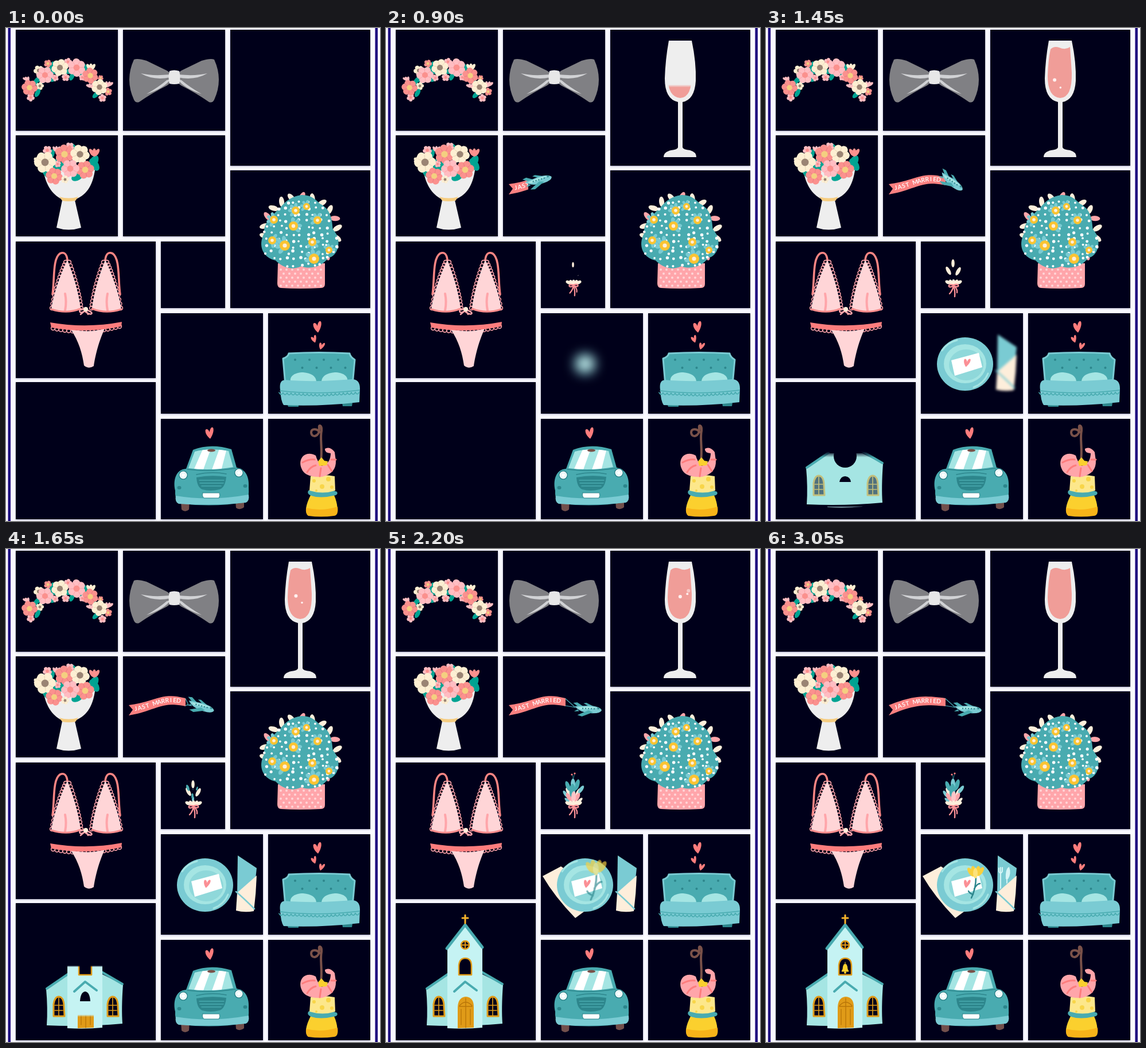
An HTML page with a canvas that plays this animation: 652x859 px, repeating every 3.1 s.

```html
<!DOCTYPE html>
<html>
<head>
<meta charset="utf-8">
<style>
html, body { margin: 0; width: 100%; height: 100%; overflow: hidden; background: #fff; }
canvas { display: block; }
</style>
</head>
<body>
<canvas id="stage" width="652" height="859"></canvas>
<script>
const W = 652, H = 859, LOOP = 3100, STEP = 50, TAU = Math.PI * 2;
const NIGHT = '#00001a', TEAL = '#49abb0', SKY = '#7acbd3', ICE = '#a5e5e3', DEEP = '#2d868c',
  CORAL = '#fd7d7d', PINK = '#ffa5aa', BLUSH = '#ffd5d7', CREAM = '#fdeedb', LEAF = '#00a392',
  GOLD = '#e09b18', SUN = '#fbd02e', BROWN = '#795149', PALE = '#eeeeee', WHITE = '#ffffff';
const stage = document.getElementById('stage').getContext('2d');
let g = stage;

// Drawing helpers
function shape(d, fill, stroke, width = 1) {
  const p = new Path2D(d);
  if (fill) { g.fillStyle = fill; g.fill(p); }
  if (stroke) {
    g.strokeStyle = stroke; g.lineWidth = width;
    g.lineCap = g.lineJoin = 'round';
    g.stroke(p);
  }
}
function oval(x, y, rx, ry, fill, turn = 0) {
  g.beginPath(); g.ellipse(x, y, rx, ry, turn, 0, TAU);
  g.fillStyle = fill; g.fill();
}
const dot = (x, y, r, fill) => oval(x, y, r, r, fill);
function ring(x, y, r, color, width) {
  g.beginPath(); g.arc(x, y, r, 0, TAU);
  g.strokeStyle = color; g.lineWidth = width; g.stroke();
}
function at(x, y, turn, scale, draw) {
  g.save(); g.translate(x, y); g.rotate(turn); g.scale(scale, scale);
  draw(); g.restore();
}
function mirror(axis, draw) {
  draw();
  g.save(); g.translate(2 * axis, 0); g.scale(-1, 1); draw(); g.restore();
}
function heart(x, y, size, turn = 0, fill = CORAL) {
  at(x, y, turn, size, () =>
    shape('M0,1.1 C-.5,.6 -.9,-.1 -.75,-.7 C-.5,-1 -.1,-.7 0,-.2 C.2,-1 .6,-1.3 .8,-.9 C.9,-.2 .4,.6 0,1.1Z', fill));
}
function random(seed) {
  return () => (seed = seed * 16807 % 2147483647) / 2147483647;
}
function layer(draw) {
  const c = document.createElement('canvas'), keep = g;
  c.width = W; c.height = H;
  g = c.getContext('2d'); draw(); g = keep;
  return c;
}

// Flowers
const KINDS = {
  s: ['#fb918e', '#f4cf80', '#dd7674'],
  c: ['#fdefd3', '#9a8474', '#e0cda9'],
  p: ['#ffbdc2', '#fb918e', '#f39a9f']
};
function flower(x, y, r, kind) {
  const [petal, heartColor, vein] = KINDS[kind], n = r > 9 ? 6 : 5;
  for (let i = 0; i < n; i++) {
    const a = i * TAU / n + x, px = Math.cos(a), py = Math.sin(a);
    oval(x + px * r * .58, y + py * r * .58, r * .42, r * .42, petal, a);
  }
  dot(x, y, r * .55, petal);
  g.strokeStyle = vein; g.lineWidth = .7;
  g.beginPath();
  for (let i = 0; i < n; i++) {
    const a = (i + .5) * TAU / n + x;
    g.moveTo(x + Math.cos(a) * r * .3, y + Math.sin(a) * r * .3);
    g.lineTo(x + Math.cos(a) * r * .72, y + Math.sin(a) * r * .72);
  }
  g.stroke();
  dot(x, y, r * .34, heartColor);
}
function garden(list) {
  for (const item of list.split(' ')) {
    const [x, y, r, kind] = item.split(',');
    flower(+x, +y, +r, kind);
  }
}
function tulip(x, y, r, fill, turn = 0) {
  for (const k of [-.55, 0, .55]) oval(x + k * r, y, r * .42, r * .9, fill, k + turn);
}

// Still pictures
function frame() {
  g.fillStyle = '#fafaff'; g.fillRect(0, 0, W, H);
  g.fillStyle = '#1e0680'; g.fillRect(3.5, 0, 4.5, H); g.fillRect(643.5, 0, 4.5, H);
  g.fillStyle = WHITE; g.fillRect(0, 0, 3, H); g.fillRect(649, 0, 3, H);
  const cells = [[17, 3, 178, 176], [204, 3, 178, 176], [391, 3, 244, 237], [17, 187, 178, 176],
    [204, 187, 178, 176], [391, 248, 244, 240], [17, 372, 244, 238], [270, 372, 112, 116],
    [270, 497, 178, 175], [457, 497, 178, 175], [17, 617, 244, 239], [270, 681, 178, 175], [457, 681, 178, 175]];
  g.save();
  g.fillStyle = NIGHT; g.shadowColor = 'rgba(30,25,80,.35)'; g.shadowBlur = 3; g.shadowOffsetY = 1;
  for (const [x, y, w, h] of cells) g.fillRect(x, y, w, h);
  g.restore();
}
function wreath() {
  shape('M42,113 Q52,78 92,75 Q145,75 163,106', null, LEAF, 8);
  for (const [x, y, a] of [[55, 113, .5], [60, 90, -.6], [80, 66, .3], [84, 88, .9], [115, 84, .4], [137, 68, -.5], [157, 116, .8]])
    oval(x, y, 4, 8, LEAF, a);
  tulip(148, 68, 7, KINDS.c[0]); tulip(36, 89, 5, KINDS.p[0], -.5);
  tulip(179, 98, 6, KINDS.p[0], .4); tulip(148, 101, 6, KINDS.p[0], -.7);
  garden('73,62,7,s 108,59,7,p 86,87,6,p 104,86,7,p 133,86,6,p 165,87,5,s 43,121,7,p 178,111,7,s 168,122,7,p ' +
    '57,74,9,c 59,101,7,c 68,82,15,p 123,69,16,p 94,69,15,c 147,83,14,s 163,103,14,c 41,104,14,s');
}
function bow() {
  mirror(293, () => {
    shape('M223,55 Q229,52 245,57 L280,74 Q287,77 287,86 Q287,97 281,100 Q255,113 232,129 Q226,131 223,125 Q207,90 223,55Z', '#808084');
    shape('M286,86 Q257,92 235,79 Q255,84 286,81Z M287,89 Q276,105 245,115 Q266,103 280,91Z', '#d1d2d5');
  });
  shape('M285,75 Q293,72 302,75 Q305,86 302,97 Q293,99 285,97 Q282,86 285,75Z', '#e7e7e8');
}
function bouquet() {
  shape('M64,242 C68,272 80,290 97,298 L122,298 C142,290 153,272 156,240Z M98,300 L88,348 Q109,355 131,348 L120,300Z', PALE);
  shape('M93,294 Q109,299 126,294 L121,301 Q109,303 98,301Z', '#f6cd81');
  for (const [x, y, a] of [[76, 222, .6], [88, 240, 0], [117, 212, -.4], [153, 233, .5], [154, 238, -.6], [98, 240, 1], [72, 252, -.7], [125, 258, 1]])
    oval(x, y, 7, 12, LEAF, a);
  tulip(154, 217, 8, KINDS.s[0]); tulip(88, 211, 6, KINDS.p[0]);
  garden('72,213,8,p 111,207,8,p 54,230,6,c 90,237,6,p 102,220,17,s 129,220,17,c 68,234,19,c ' +
    '84,258,15,s 138,247,16,s 112,245,16,p 103,264,7,c');
}
function bush() {
  for (let i = 0; i < 19; i++) {
    const a = -4.15 + i * .29;
    oval(514 + Math.cos(a) * 64, 354 + Math.sin(a) * 60, 9, 4.5, i % 4 == 1 ? PINK : CREAM, a + (i % 2 - .5) * .9);
  }
  shape('M474,410 L556,410 L556,446 Q556,453 549,453 Q512,455 479,453 Q473,452 473,445Z', PINK);
  for (let y = 421, k = 0; y < 452; y += 7, k++)
    for (let x = 479 + k % 2 * 5; x < 554; x += 10) dot(x, y, 2, BLUSH);
  const blob = 'M515,291 C532,290 541,300 547,306 C570,317 568,341 570,351 C588,370 578,399 562,400 C551,417 528,421 515,415 C496,424 480,415 470,405 C449,401 438,380 450,358 C448,339 466,325 478,313 C489,300 499,293 515,291Z';
  shape(blob, TEAL);
  const area = new Path2D(blob), rnd = random(41);
  for (let y = 300; y < 415; y += 11)
    for (let x = 450; x < 582; x += 12) {
      const px = x + rnd() * 7, py = y + rnd() * 6;
      if (g.isPointInPath(area, px, py)) dot(px, py, 1.8 + rnd(), WHITE);
    }
  for (const [x, y, r] of [[505, 318, 7], [524, 311, 6], [467, 334, 7], [501, 345, 8], [543, 335, 7], [464, 370, 7], [486, 379, 9], [534, 373, 7], [563, 387, 6], [537, 402, 9]]) {
    for (let i = 0; i < 4; i++) {
      const a = i * .8 + x;
      oval(x + Math.cos(a) * r * 1.2, y + Math.sin(a) * r * 1.2, r * .7, r * .42, SKY, a);
    }
    dot(x, y, r, '#fbc432'); dot(x, y, r * .4, CREAM);
  }
}
function beads(x0, y0, cx, cy, x1, y1, n, color) {
  for (let i = 0; i <= n; i++) {
    const u = i / n, v = 1 - u;
    ring(v * v * x0 + 2 * u * v * cx + u * u * x1, v * v * y0 + 2 * u * v * cy + u * u * y1, 3.4, color, 1.6);
  }
}
function bikini() {
  mirror(140, () => {
    shape('M81,464 C85,438 81,402 94,393 Q105,388 107,404', null, '#f98583', 3.6);
    beads(104, 408, 90, 438, 80, 488, 13, PINK);
    beads(110, 408, 125, 448, 131, 488, 13, PINK);
    shape('M107,404 C113,420 125,450 130,488 Q105,501 79,490 C83,460 97,425 107,404Z', BLUSH);
    shape('M103,463 Q106,477 103,492', null, PINK, 4);
    shape('M79,490 Q106,499 130,489', null, '#f98c8c', 3);
  });
  shape('M137,491 C125,485 126,502 137,493 C147,503 158,497 140,491 M137,493 L130,499 M140,493 L143,499', null, PINK, 2.5);
  dot(139, 490, 4, CREAM);
  beads(82, 523, 140, 536, 198, 520, 17, PINK);
  shape('M113,525 Q142,532 172,524 C160,550 155,575 153,589 Q144,595 136,588 C133,567 127,546 113,525Z', BLUSH);
  shape('M77,513 Q140,524 202,512 L201,520 Q140,533 79,522Z', CORAL);
}
function couch() {
  heart(543, 521, 9, -.1); heart(537, 542, 6, -.3); heart(550, 554, 6, .3);
  shape('M490,654 h20 v6 h-18Z M586,653 h18 l-1,6 h-16Z', DEEP);
  shape('M483,576 Q492,573 493,567 Q545,564 599,567 Q600,573 608,578 L604,622 L487,622Z', TEAL, SKY, 3);
  for (let i = 0; i < 8; i++)
    dot(504 + i * 12.5, i % 2 ? 592 : 578, 2, DEEP);
  mirror(545.5, () => shape('M496,616 C494,607 503,600 518,600 Q540,602 541,616Z', ICE));
  shape('M478,630 C476,612 484,612 495,614 Q545,617 603,612 Q617,612 617,628 L616,652 Q545,660 484,657 Q479,650 478,630Z', SKY);
  let wave = 'M476,635';
  for (let x = 476; x < 612; x += 7) wave += ' q3.5,7 7,' + (x < 545 ? .3 : -.4);
  shape(wave, null, TEAL, 1.6);
  shape('M478,632 Q545,640 616,631', null, TEAL, 1.6);
}
function car() {
  heart(355, 706, 9, -.1);
  shape('M305,824 h15 l-1,15 q-7,6 -13,0Z M400,824 h15 v11 q-7,6 -14,1Z', '#72504c');
  shape('M314,768 L326,735 Q357,723 393,734 L402,766 C420,769 424,785 423,800 Q424,817 420,826 Q360,836 300,828 Q294,817 295,806 C291,790 295,769 314,768Z', TEAL);
  const glass = 'M318,767 L329,738 Q357,731 388,737 L396,765 Q357,772 318,767Z';
  shape(glass, ICE);
  g.save(); g.clip(new Path2D(glass));
  shape('M325,775 L347,725 L360,725 L342,775Z M357,775 L375,725 L387,725 L374,775Z', WHITE);
  g.restore();
  oval(358, 736, 7, 2.5, BROWN);
  shape('M316,769 Q357,774 400,767 M332,778 Q358,772 384,777', null, DEEP, 1.5);
  for (const [x, y] of [[309, 779], [406, 775]]) { dot(x, y, 8, DEEP); dot(x, y, 6.5, WHITE); ring(x, y, 4, '#cfeff0', 1.2); }
  shape('M332,783 Q357,778 384,782 Q382,801 372,804 Q357,808 342,804 Q333,800 332,783Z', DEEP);
  shape('M337,788 H380 M338,793 H379 M341,798 H375', null, TEAL, 1.5);
  oval(302, 801, 3.5, 3, DEEP); oval(417, 798, 3.5, 3, DEEP);
  shape('M296,815 Q357,825 423,813 Q425,824 418,827 Q357,833 301,829 Q294,826 296,815Z', SKY);
  shape('M343,810 h29 q2,5 -1,9 h-26 q-4,-4 -2,-9Z', WHITE, DEEP, 1);
}
function canape() {
  shape('M549,752 C552,735 547,715 550,702 C551,691 544,690 546,698 C547,712 533,715 532,705 C532,698 541,697 547,704', null, BROWN, 4);
  shape('M531,814 Q549,809 572,814 Q582,838 574,849 Q549,853 526,849 Q518,840 531,814Z', SUN);
  shape('M523,836 Q550,843 578,834 Q580,849 572,850 Q549,853 527,850 Q522,847 523,836Z', '#f8b319');
  shape('M527,806 Q550,798 577,808 Q580,814 570,815 Q548,820 532,815 Q524,812 527,806Z', TEAL);
  shape('M531,781 Q553,777 573,781 L574,806 Q552,813 529,806Z', '#fde78b');
  for (const [x, y, r] of [[537, 789, 3], [562, 786, 4], [551, 799, 4], [568, 800, 3], [541, 806, 2]]) dot(x, y, r, '#f8d548');
  shape('M540,745 C523,735 508,749 515,767 Q521,784 551,782 Q576,776 575,754 L573,739 Q565,728 556,733 Q555,740 566,741 Q566,759 550,763 Q543,756 540,745Z', PINK);
  shape('M517,757 Q528,751 538,752 M525,774 Q531,764 540,762 M547,781 L549,767 M568,772 L561,761 M575,752 L567,752', null, CORAL, 3);
  shape('M544,755 L550,748 L555,754 L561,755 L559,762 L546,763Z', SUN);
}
const scenery = layer(() => [frame, wreath, bow, bouquet, bush, bikini, couch, car, canape].forEach(draw => draw()));

// Moving pieces
const glass = layer(() => shape('M493,22 L533,22 Q541,60 540,92 Q538,125 517,129 L517,208 Q518,212 530,213 Q541,216 541,225 L484,225 Q484,216 497,213 Q508,212 509,208 L509,129 Q486,124 486,88 Q487,55 493,22Z', PALE));
const wine = layer(() => shape('M496,37 Q502,31 511,34 Q522,39 530,33 L533,78 Q534,121 513,122 Q491,120 491,84 Q492,55 496,37Z', '#f09d98'));

const napkin = layer(() => shape('M305,553 L273,570 Q294,606 330,643 L382,605Z', CREAM));
const plate = layer(() => {
  oval(347, 585.5, 49, 46.5, SKY);
  shape('M307,562 Q316,548 333,544 M387,602 Q380,619 362,626', null, ICE, 3);
  oval(347, 585, 37, 34, ICE);
  oval(349, 587, 30, 27, '#8fd8da');
  shape('M323,579 L371,566 L377,591 L329,606Z', WHITE);
  heart(350, 583, 7, .2, '#fb8f95');
});
const pocket = layer(() => {
  shape('M404,534 L437,556 L435,575 L403,602Z', SKY);
  shape('M403,599 L437,569 Q436,600 432,631 Q416,634 401,630Z', CREAM);
  shape('M401,597 Q415,609 433,627', null, SKY, 2.5);
});
const bloom = layer(() => {
  shape('M366,571 Q366,592 358,608 M363,592 Q368,583 373,583 M361,602 Q355,600 353,596', null, DEEP, 2.5);
  for (const [x, y, a] of [[357, 563, -.6], [374, 562, .6], [362, 561, -.2], [369, 561, .2], [365, 565, 0]])
    oval(x, y, 4, 9, x == 365 ? '#fde27a' : '#f8d03f', a);
});
function cutlery(drop) {
  g.save();
  g.clip(new Path2D('M404,537 L437,556 L435,570 L403,597Z'));
  g.translate(0, drop);
  shape('M406,556 V562 Q409,567 412,562 V555 M409,555 V592 M420,572 V588', null, '#d6f5f6', 2);
  shape('M418,575 Q417,556 424,554 Q428,566 422,575Z', '#d6f5f6');
  g.restore();
}

function archWindow(x, y) {
  shape(`M${x - 9},${y + 17} V${y - 4} Q${x - 7},${y - 17} ${x},${y - 17} Q${x + 9},${y - 16} ${x + 9},${y} L${x + 10},${y + 17}Z`, NIGHT, GOLD, 3);
  shape(`M${x},${y - 15} V${y + 16} M${x - 7},${y - 2} H${x + 7} M${x - 7},${y + 7} H${x + 7}`, null, GOLD, 1.6);
}
const house = layer(() => {
  shape('M70,767 L110,741 H168 L204,759 Q201,800 203,827 Q138,833 71,830 Q73,800 70,767Z', ICE);
  shape('M71,766 L109,740 M167,737 L203,758', null, TEAL, 4);
});
const sideWindows = layer(() => { archWindow(92, 797); archWindow(186, 797); });
const tower = layer(() => {
  shape('M107,694 L138,655 L168,692 L168,834 Q138,837 107,835Z', '#c5f3f3');
  shape('M106,696 L138,655 L168,694', null, TEAL, 5);
  dot(138, 690, 7, NIGHT); ring(138, 690, 7, GOLD, 2.5);
  shape('M138,684 V696 M132,690 H144', null, GOLD, 2);
  shape('M127,742 V726 Q128,713 138,713 Q149,713 149,727 V742Z', NIGHT, GOLD, 2.5);
  shape('M119,771 L138,754 L158,769', null, TEAL, 4);
});
const door = layer(() => {
  shape('M125,835 V798 Q126,781 139,780 Q153,781 153,798 V834Z', GOLD);
  shape('M128,796 Q139,783 150,796 M139,783 V834 M131,802 V829 M147,802 V829 M128,797 H150', null, '#b87509', 1.3);
});
const cross = layer(() => shape('M138,638 V652 M133,643 H143', null, '#f4b22b', 3));
function bell(swing, size) {
  at(138, 720, swing, size, () => {
    shape('M0,0 V3 M-2,4 Q-4,7 -4,12 L-6,16 H6 L4,12 Q4,7 2,4Z', SUN, SUN, 1);
    dot(0, 18, 2, SUN);
  });
}

// Small posy: x, y, length, turn, colour, start time
const POSY = [
  [326, 410, 7, 0, CREAM, 750], [335, 424, 8, .5, CREAM, 850], [318, 423, 8, -.5, CREAM, 900],
  [326, 436, 5, 0, SKY, 1350], [317, 413, 9, -.35, TEAL, 1500], [333, 411, 10, .3, TEAL, 1550],
  [326, 410, 10, 0, SKY, 1600], [340, 419, 8, .6, SKY, 1650], [313, 427, 7, -.6, SKY, 1700],
  [325, 422, 13, 0, TEAL, 1550], [319, 433, 9, -.5, PINK, 1750], [333, 433, 9, .5, PINK, 1800],
  [327, 432, 10, .05, '#ffc5c8', 1850], [316, 438, 6, -.8, SKY, 1700], [338, 438, 6, .8, CREAM, 1750]];
function posy(t) {
  const tip = ramp(t, 1650, 1950);
  if (tip) {
    g.save(); g.globalAlpha = tip;
    shape('M326,405 Q327,397 324,392 M326,402 L329,391', null, DEEP, 1);
    dot(324, 393, 1.6, CORAL); dot(329, 391, 1.6, CORAL);
    g.restore();
  }
  for (const [x, y, size, turn, color, start] of POSY) {
    const k = ramp(t, start, start + 250);
    if (k) oval(x, y + (1 - k) * size, size * .4 * k, size * k, color, turn);
  }
  at(327, 446, 0, ramp(t, 650, 950), () => {
    for (const a of [-1.1, -.5, 0, .5, 1.1]) oval(a * 9, -3, 3, 5, CREAM, a);
    shape('M0,2 C-12,-2 -10,10 0,3 C11,9 11,-3 0,2 M0,3 Q-2,12 -7,17 M0,3 Q3,12 2,22 M1,3 Q7,9 6,15', null, '#fb9095', 2.4);
  });
}

// Banner and plane
function banner(t, edge) {
  const w = t < 2200 ? 0 : .5 - .5 * Math.cos((t - 2200) / 850 * Math.PI);
  const mid = u => 281 - 14 * u - (6 + 2 * w) * Math.sin(Math.PI * u) + 2.5 * (1 - w) * Math.sin(TAU * u);
  g.save();
  g.beginPath(); g.rect(204, 187, edge - 204, 176); g.clip();
  g.beginPath();
  for (let u = 0; u <= 1.001; u += .05) g.lineTo(214 + 99 * u, mid(u) - 9 + 2 * u);
  for (let u = 1; u >= -.001; u -= .05) g.lineTo(214 + 99 * u, mid(u) + 9 - 2 * u);
  g.lineTo(221, mid(0) - 1);
  g.fillStyle = '#fb8080'; g.fill();
  g.fillStyle = WHITE; g.font = '600 10.5px Lato, sans-serif';
  g.textAlign = 'center'; g.textBaseline = 'middle';
  [...'JAST MARRIED'].forEach((ch, i) => {
    const u = .125 + i * .0685;
    at(214 + 99 * u, mid(u), Math.atan2(mid(u + .03) - mid(u - .03), 6), 1, () => g.fillText(ch, 0, 0));
  });
  g.restore();
  return mid(1);
}
function plane() {
  shape('M2,-6 L-7,-11 L-2,-12 L11,-6Z', TEAL);
  shape('M-14,-3 L-25,-11 L-18,-12 L-8,-6Z M-17,0 L-23,4 L-14,3Z', TEAL);
  shape('M-22,-5 Q-10,-6 2,-7 Q22,-7 25,0 Q23,6 8,6 Q-13,6 -22,-5Z', SKY);
  shape('M-18,-3 Q2,-7 19,-4 Q4,-1 -12,0Z', ICE);
  shape('M2,1 L-17,10 L-9,12 L10,4Z', TEAL);
  shape('M17,-5 L22,-3 L18,-1Z', DEEP);
  for (let x = -8; x < 14; x += 5) dot(x, -2, 1.2, DEEP);
}
function flight(t) {
  const x = track(t, [200, 212, 550, 237, 1100, 281, 1450, 322, 1800, 351]);
  const y = track(t, [200, 279, 550, 274, 1100, 263, 1450, 268, 1800, 280]);
  const turn = track(t, [200, -.2, 550, .02, 900, -.3, 1100, -.2, 1450, .6, 1800, .04]);
  const edge = track(t, [600, 212, 1100, 272, 1450, 314]);
  if (t > 600) {
    const end = banner(t, edge);
    if (t > 1500) shape(`M313,${end - 6} L${x - 21},${y - 4} M313,${end + 6} L${x - 21},${y - 4}`, null, TEAL, 1.2);
  }
  at(x, y, turn, ramp(t, 200, 450), plane);
}

// Timing
function ramp(t, from, to) {
  const k = Math.min(1, Math.max(0, (t - from) / (to - from)));
  return k * k * (3 - 2 * k);
}
function track(t, keys) {
  if (t <= keys[0]) return keys[1];
  for (let i = 2; i < keys.length; i += 2)
    if (t <= keys[i]) {
      const k = (t - keys[i - 2]) / (keys[i] - keys[i - 2]);
      return keys[i - 1] + (keys[i + 1] - keys[i - 1]) * k;
    }
  return keys[keys.length - 1];
}
function show(img, { alpha = 1, size = 1, x = 0, y = 0, blur = 0 } = {}) {
  if (alpha <= 0 || size <= 0) return;
  g.save();
  g.globalAlpha = alpha;
  if (blur > .1) g.filter = `blur(${blur}px)`;
  g.translate(x, y); g.scale(size, size); g.translate(-x, -y);
  g.drawImage(img, 0, 0);
  g.restore();
}
const scratch = layer(() => {});
function rise(img, edge, soft) {
  const s = scratch.getContext('2d'), fade = s.createLinearGradient(0, edge, 0, edge + soft);
  fade.addColorStop(0, 'transparent'); fade.addColorStop(1, '#000');
  s.globalCompositeOperation = 'copy'; s.drawImage(img, 0, 0);
  s.globalCompositeOperation = 'destination-in';
  s.fillStyle = fade; s.fillRect(0, 0, W, H);
  g.drawImage(scratch, 0, 0);
}

function toast(t) {
  show(glass, { size: ramp(t, 0, 650), x: 513, y: 225 });
  if (t > 700) rise(wine, track(t, [700, 124, 1100, 73, 1450, 26]), 5);
  for (const [x, y, r, start, end] of [[502, 95, 3, 1350, 2050], [512, 109, 1.8, 1350, 1950], [521, 97, 3, 1650, 2350], [510, 94, 3, 1950, 2650], [523, 87, 2, 2000, 2700]]) {
    if (t < start || t > end) continue;
    const k = (t - start) / (end - start);
    g.save();
    g.globalAlpha = Math.min(1, k * 8, (1 - k) * 2.5);
    dot(x + k * 8, y - k * 31, r, '#fff0ef');
    g.restore();
  }
}
function table(t) {
  show(napkin, { alpha: t > 1600 ? 1 : 0, size: .6 + .4 * ramp(t, 1600, 2150), x: 347, y: 590 });
  const k = ramp(t, 650, 1250);
  show(plate, { size: k, x: 347, y: 585, blur: 16 * (1 - k) });
  show(pocket, { alpha: ramp(t, 1250, 1450), blur: 8 * (1 - ramp(t, 1250, 1550)) });
  show(bloom, { alpha: ramp(t, 1950, 2350), size: 1.5 - .5 * ramp(t, 1950, 2450), x: 362, y: 595 });
  if (t > 2250) cutlery(36 * (1 - ramp(t, 2250, 2850)));
}
function chapel(t) {
  if (t > 1150) rise(house, track(t, [1150, 832, 1450, 738, 1500, 715]), 10);
  show(sideWindows, { alpha: ramp(t, 1250, 1650) });
  if (t > 1300 && t <= 1500) {
    dot(138, 746, 20, NIGHT);
    shape('M128,791 Q130,781 138,781 Q147,782 148,791Z', NIGHT);
  }
  if (t > 1400) rise(tower, track(t, [1400, 838, 1450, 833, 1800, 645]), 3);
  if (t > 1550) {
    if (t < 2050) shape('M129,788 Q130,772 138,771 Q146,772 147,788Z', NIGHT);
    rise(door, track(t, [1550, 836, 1800, 774]), 4);
  }
  show(cross, { size: ramp(t, 1700, 1850), x: 138, y: 652 });
  if (t > 2200) bell(.5 * Math.sin((t - 2250) / 80) * (1 - ramp(t, 2250, 2750)), ramp(t, 2200, 2400));
}
function paint(now) {
  const t = Math.floor(now % LOOP / STEP) * STEP;
  g.drawImage(scenery, 0, 0);
  toast(t); flight(t); posy(t); table(t); chapel(t);
  requestAnimationFrame(tick);
}
const began = performance.now();
const tick = () => paint(performance.now() - began);
tick();
</script>
</body>
</html>
```
